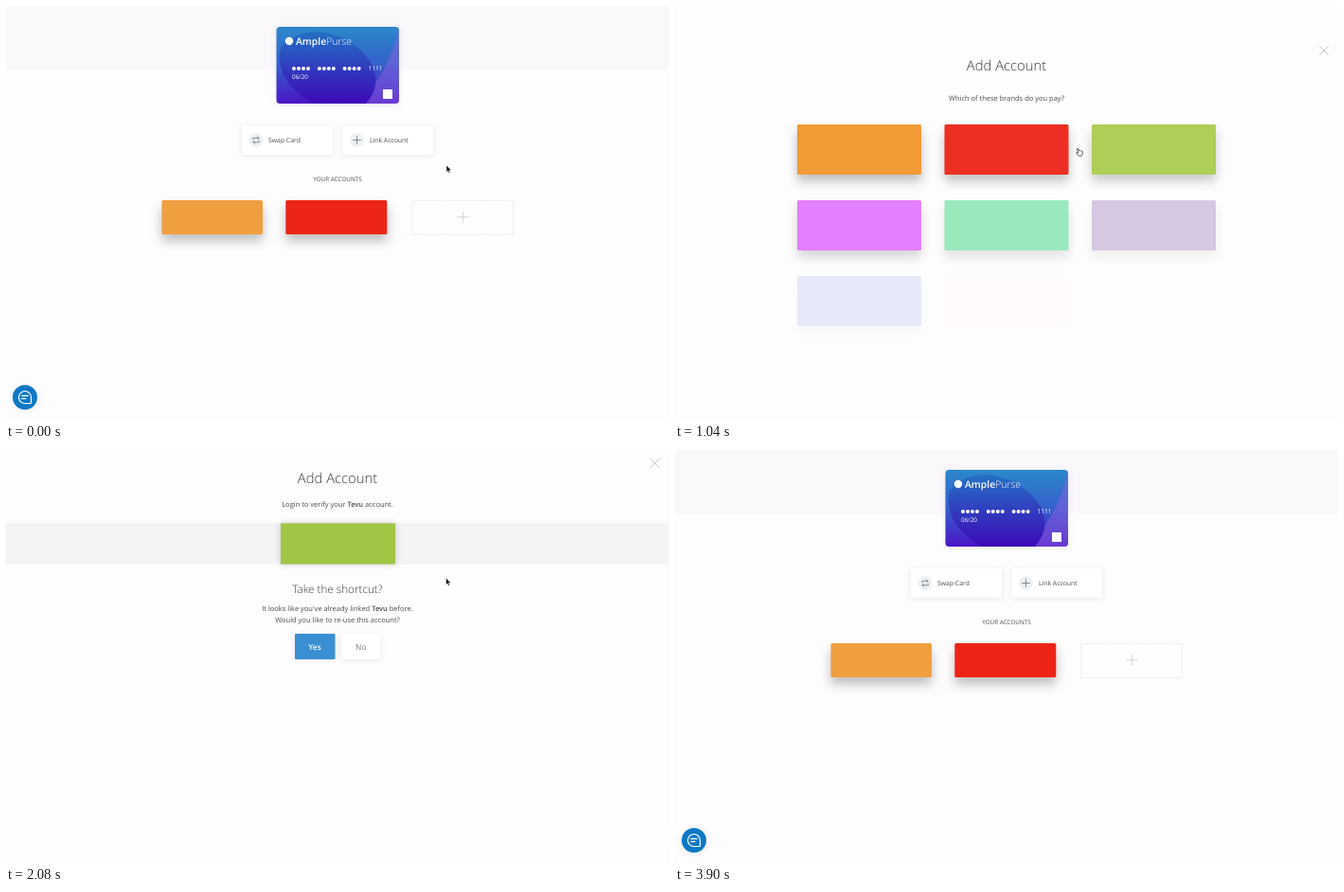
These frames come from a looping animation (700 by 438 pixels, 4.3 s). An HTML page:

```html
<!DOCTYPE html>
<html lang="en">
<head>
<meta charset="utf-8">
<title>Add Account</title>
<style>
  html, body { margin: 0; width: 100%; height: 100%; overflow: hidden; background: #fefdfe; }
  svg { display: block; width: 100%; height: 100%; }
  text { font-family: "Open Sans", sans-serif; font-size: 7.5px; fill: #4a4d52; text-rendering: geometricPrecision; }
  .mid { text-anchor: middle; }
  .light { font-weight: 300; fill: #3a3d42; }
  .bold { font-weight: 600; }
  .small { font-size: 6.85px; }
  .white, .white tspan { fill: #fff; }
  .raised { filter: drop-shadow(0 7px 6px rgba(0, 0, 0, .25)); }
  .soft { filter: drop-shadow(0 1px 3px rgba(40, 50, 70, .11)); }
  .line { fill: none; stroke-linecap: round; stroke-linejoin: round; }
</style>
</head>
<body>
<svg viewBox="0 0 700 438">
  <defs>
    <linearGradient id="sky" x2="0" y2="1">
      <stop offset="0" stop-color="#2b88ca"/>
      <stop offset=".5" stop-color="#3560cc"/>
      <stop offset="1" stop-color="#4a14c6"/>
    </linearGradient>
    <linearGradient id="deep" x2="0" y2="1">
      <stop offset="0" stop-color="#2470c4"/>
      <stop offset="1" stop-color="#3d08b8"/>
    </linearGradient>
    <clipPath id="cardShape"><rect x="285.5" y="22" width="129.5" height="81" rx="4"/></clipPath>
  </defs>

  <rect id="header" width="700" fill="#faf8fb"/>

  <g id="card">
    <g class="soft">
      <g clip-path="url(#cardShape)">
        <rect x="285" y="22" width="130" height="81" fill="url(#sky)"/>
        <path d="M415 22V103H368Q404 76 415 22Z" fill="#8a62e0" opacity=".5"/>
        <path d="M290 44C312 18 352 24 378 50Q402 78 380 103H324Q282 78 290 44Z" fill="url(#deep)"/>
      </g>
    </g>
    <circle cx="299" cy="37" r="4.2" fill="#fff"/>
    <text class="white" x="306" y="40.5" style="font-size:10.4px"><tspan class="bold">Ample</tspan><tspan class="light">Purse</tspan></text>
    <g id="dots" fill="#fff"></g>
    <text class="white" x="382.5" y="68.3" style="font-size:6.6px">1111</text>
    <text class="white" x="302" y="77" style="font-size:6.4px">06/20</text>
    <rect x="398" y="88" width="10" height="10" fill="#fff"/>
  </g>

  <g id="chat">
    <circle class="soft" cx="20" cy="413" r="13" fill="#0f78c4"/>
    <path class="line" d="M20 406.5a6.5 6.5 0 1 0 0 13h5.5q1 0 1-1V413a6.5 6.5 0 0 0-6.5-6.5M16.8 411.4h6.4M16.8 414.4h4" stroke="#fff" stroke-width="1.2"/>
  </g>

  <g id="home">
    <rect class="soft" x="249" y="126" width="96" height="31" rx="2" fill="#fff"/>
    <rect id="link" class="soft" x="355.5" y="126" width="95.5" height="31" rx="2"/>
    <circle cx="264" cy="141.5" r="7.5" fill="#eef1f3"/>
    <circle cx="370.5" cy="141.5" r="7.5" fill="#eef1f3"/>
    <path class="line" d="M260.8 141v-1.7h6.2m-1.4-1.4 1.4 1.4-1.4 1.4M267.3 142v1.8h-6.2m1.4-1.4-1.4 1.4 1.4 1.4M366.5 141.5h8m-4-4v8" stroke="#6d757c" stroke-width=".8"/>
    <text class="small" x="277" y="144">Swap Card</text>
    <text class="small" x="384" y="144">Link Account</text>
    <text class="mid" x="350" y="184.5" style="font-size:6.35px">YOUR ACCOUNTS</text>
    <rect class="raised" x="164.5" y="205" width="106.5" height="36" rx="1.5" fill="#f09f40"/>
    <rect class="raised" x="295.3" y="205" width="107" height="36" rx="1.5" fill="#ec2517"/>
    <rect x="429" y="205.3" width="106.5" height="36" fill="none" stroke="#dcdde2" stroke-width=".8" stroke-dasharray="1.5 1"/>
    <path class="line" d="M476.5 222.8h11.5m-5.75-5.75v11.5" stroke="#d3d4d8"/>
  </g>

  <g id="modal">
    <path class="line" d="m680.5 10.5 9 9m0-9-9 9" stroke="#bcbdc2" stroke-width=".8"/>
    <text class="mid light" x="350" y="36" style="font-size:14.8px">Add Account</text>
    <g id="brands">
      <text class="mid" x="350" y="67.5">Which of these brands do you pay?</text>
    </g>
    <g id="login">
      <text class="mid" x="350" y="61">Login to verify your <tspan class="bold">Tevu</tspan> account.</text>
      <rect y="78" width="700" height="44" fill="#f4f4f6"/>
      <rect x="290" y="78.5" width="121" height="43" fill="#a1c544" style="filter:drop-shadow(0 0 3px rgba(0,0,0,.22))"/>
      <g id="prompt">
        <text class="mid light" x="350" y="152" style="font-size:11.7px">Take the shortcut?</text>
        <text class="mid" x="350" y="170.7">It looks like you've already linked <tspan class="bold">Tevu</tspan> before.</text>
        <text class="mid" x="350" y="182.5">Would you like to re-use this account?</text>
        <rect class="soft" x="305" y="195" width="42.5" height="27" rx="1" fill="#3a8fd2"/>
        <rect class="soft" x="354.5" y="195" width="40.5" height="27" rx="1" fill="#fff"/>
        <text class="mid bold white" x="326" y="212" style="font-size:8.4px">Yes</text>
        <text class="mid" x="374.8" y="212" style="font-size:8.4px;fill:#777">No</text>
      </g>
    </g>
  </g>

  <g id="cursor">
    <path id="arrow" d="M0 0V7.4L1.7 5.9 2.8 8.5 4 8 2.9 5.4H5.2Z" fill="#111" stroke="#fff" stroke-width=".5"/>
    <path id="hand" class="line" transform="translate(0 .5) scale(.9)" d="M-.6 .7Q0-.3.8.6L1.9 3.3Q3 2.4 3.6 3.2 4.6 2.7 5 3.5 6 3.4 6 4.6L5.7 7.2 4.8 9H1.3L-1.4 5.7Q-1.3 4.6-.1 5.1L.5 5.4Z" style="fill:#fff" stroke="#222" stroke-width=".8"/>
  </g>
</svg>

<script>
const LOOP = 4300, STEP = 130, DROP = 440;
const $ = id => document.getElementById(id);

function add(parent, tag, attrs) {
  const el = document.createElementNS("http://www.w3.org/2000/svg", tag);
  for (const k in attrs) el.setAttribute(k, attrs[k]);
  return parent.appendChild(el);
}

for (let i = 0; i < 12; i++)
  add($("dots"), "circle", { cx: 304 + (i % 4) * 5 + Math.floor(i / 4) * 26.8, cy: 66, r: 2 });

const colors = ["#f19a36", "#ec2517", "#9cc534", "#d63cff", "#1ed26b", "#652d90", "#1446c8", "#ff00c4",
  "#000", "#d91e26", "#000", "#a6198a", "#ff8400", "#252a75", "#16ace0"];
const tiles = colors.map((fill, i) => add($("brands"), "rect", {
  class: "raised", fill, rx: 1.5, width: 131, height: 53,
  x: 129 + (i % 3) * 155.5, y: Math.round(92.8 + Math.floor(i / 3) * 80.3)
}));

// Progress from 0 to 1 between two times, plain and eased
const ramp = (t, a, b) => Math.max(0, Math.min(1, (t - a) / (b - a)));
const ease = (t, a, b) => {
  const p = ramp(t, a, b);
  return p * p * (3 - 2 * p);
};

function fade(el, v) {
  el.setAttribute("opacity", v);
  el.style.display = v > 0 ? "" : "none";
}

function moveCursor(t) {
  let x = 465, y = 168;
  const glide = (a, b, dx, dy) => {
    const p = ease(t, a, b);
    x += dx * p;
    y += dy * p;
  };
  glide(0, 390, -40, -18.5);
  glide(1170, 1430, 47, -13.5);
  glide(1820, 1950, -7.5, 0);
  glide(2080, 2470, -135.5, 73);
  $("cursor").setAttribute("transform", `translate(${x} ${y})`);

  const hand = (t >= 390 && t < 1950) || t >= 2470;
  fade($("hand"), +hand);
  fade($("arrow"), +!hand);
  fade($("cursor"), +(t < 3250));
}

function draw(t) {
  const closing = ease(t, 2536, 3056);
  const back = ease(t, 3120, 3640);
  $("header").setAttribute("height", 68 * (1 - ease(t, 390, 910) + closing));
  fade($("home"), 1 - ease(t, 390, 880) + back);
  fade($("card"), 1 - ease(t, 390, 780) + back);
  fade($("chat"), 1 - ease(t, 390, 650) + back);
  $("link").setAttribute("fill", t >= 390 && t < 1000 ? "#f4f6f5" : "#fff");

  const picked = t >= 1690;
  const settling = picked && t < 1950;
  const drop = DROP * ((1 - ramp(t, 675, 1300)) ** 3 + closing);
  $("modal").setAttribute("transform", `translate(0 ${Math.round(drop)})`);
  fade($("modal"), settling ? .5 : ramp(t, 650, 940) - closing ** 1.4);
  fade($("brands"), +!picked);
  fade($("login"), +picked);
  fade($("prompt"), ramp(t, 1820, 2080));
  tiles.forEach((el, i) => fade(el, ease(t, 780 + i * 35, 1040 + i * 35)));

  moveCursor(t);
}

const start = performance.now();
function tick() {
  const t = (performance.now() - start) % LOOP;
  draw(Math.min(Math.floor(t / STEP) * STEP, 3900));
  requestAnimationFrame(tick);
}
tick();
</script>
</body>
</html>
```
